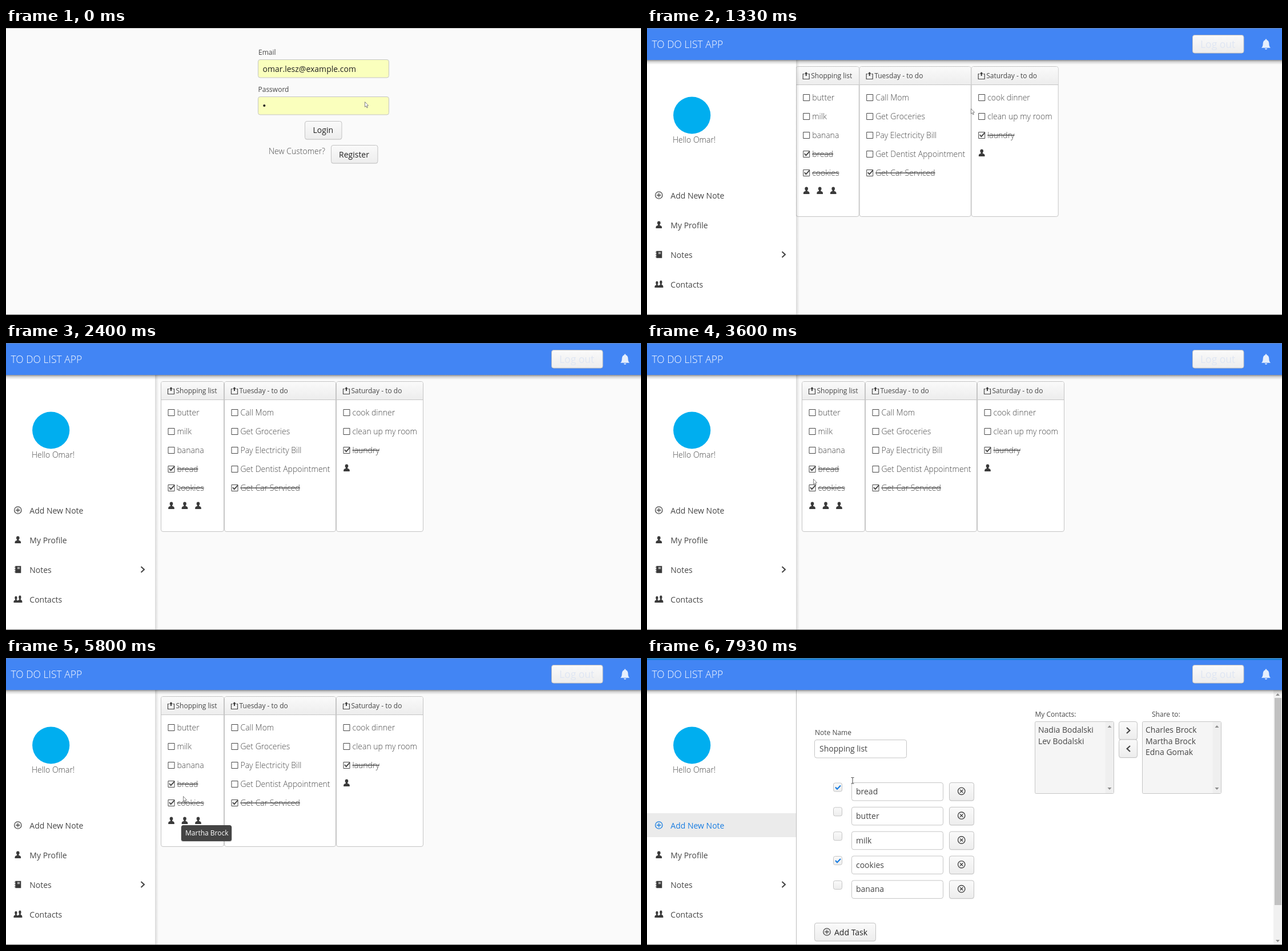
An HTML page that plays this animation: 1112 by 503 pixels, repeating every 8000 ms.

```html
<!DOCTYPE html>
<html lang="en">
<head>
<meta charset="utf-8">
<title>To do list app</title>
<style>
  html, body { margin: 0; width: 100%; height: 100%; overflow: hidden; background: #fafafa; }
  svg { display: block; }
  text { font: 14px "Open Sans", sans-serif; fill: #474747; white-space: pre; }
  .cap { font-size: 12px; }
  .light { font-weight: 300; }
  .done { text-decoration: line-through; }
  .dark { fill: #222; }
  .big { font-size: 17.5px; }
  .line { fill: none; stroke: #474747; }
  .icon { fill: #3a3a3a; }
  .field { fill: #fff; stroke: #c5c5c5; }
  .auto { fill: #faffbd; }
  .editing .nav0 text { fill: #197de1; }
  .editing .nav0 .line { stroke: #197de1; }
</style>
</head>
<body>
<svg id="stage" width="1112" height="503" viewBox="0 0 1112 503">
  <defs>
    <linearGradient id="btn" x2="0" y2="1"><stop stop-color="#fafafa"/><stop offset="1" stop-color="#ededed"/></linearGradient>
    <linearGradient id="press" x2="0" y2="1"><stop stop-color="#f3f3f3"/><stop offset="1" stop-color="#e7e7e7"/></linearGradient>
    <linearGradient id="below" x2="0" y2="1"><stop stop-opacity=".42"/><stop offset=".4" stop-opacity=".16"/><stop offset="1" stop-opacity="0"/></linearGradient>
    <linearGradient id="aside"><stop stop-opacity=".13"/><stop offset="1" stop-opacity="0"/></linearGradient>
  </defs>
</svg>
<script>
const FPS = 15, LOOP = 8000;
const stage = document.getElementById('stage');

// Drawing helpers, each returns markup
const text = (x, y, s, cls = '') => `<text x="${x}" y="${y}" class="${cls}">${s}</text>`;
const rect = (x, y, w, h, attrs = '') => `<rect x="${x}" y="${y}" width="${w}" height="${h}" ${attrs}/>`;
const path = (d, attrs = 'class="line"') => `<path d="${d}" ${attrs}/>`;
const at = (x, y, s) => `<g transform="translate(${x} ${y})">${s}</g>`;
const group = (id, s) => `<g id="${id}">${s}</g>`;
const field = (x, y, w, cls = '') => rect(x, y, w, 31.5, `rx="3.5" class="field ${cls}"`);
const button = (x, y, w, h = 31.5) =>
  rect(x, y + 1, w, h, 'rx="3.5" fill="#000" opacity=".08"') +
  rect(x, y, w, h, 'rx="3.5" fill="url(#btn)" stroke="#c3c3c3"');

const person = '<g class="icon"><ellipse cy="-3.4" rx="2.8" ry="3.2"/>' +
  path('M-5.3 6V4C-5.3 2-3 1.4-1.6.8V-1H1.6V.8C3 1.4 5.3 2 5.3 4V6Z', '') + '</g>';
const plus = '<g class="line" stroke-width="1.3"><circle r="6.2"/><path d="M-3.8 0H3.8M0-3.8V3.8"/></g>';
const cross = '<g class="line" stroke-width="1.4"><circle r="6.2"/><path d="M-2.6-2.6 2.6 2.6M2.6-2.6-2.6 2.6"/></g>';
const chevron = path('M-3-5 2.4 0-3 5', 'class="line" stroke-width="2.2"');
const notebook = path('M-4.5-6.2H5.5V6.2H-4.5Z', 'class="icon"') +
  path('M-1-3.6H3.4M-1-1.6H3.4', 'stroke="#fff"') + path('M-6-4H-4M-6 0H-4M-6 4H-4');
const people = at(-3.4, .6, `<g transform="scale(.75 .9)">${person}</g>`) +
  at(3.6, 0, `<g transform="scale(.75 1)">${person}</g>`);
const clip = path('M3.5-3.5H5.5V5.5H-5.5V-3.5H-3.5', 'class="line" stroke-width="1.2"') +
  path('M0-7 3-3.5H1V0H-1V-3.5H-3Z', 'class="icon"');
const box = done => path('M-5.5-5.5H5.5V5.5H-5.5Z') +
  (done ? path('M-3.5-1-.8 2.2 5.5-4.6', 'class="line" stroke-width="1.9"') : '');

const login =
  text(442, 46.5, 'Email', 'cap') + field(441.5, 55.5, 229, 'auto') +
  text(449.5, 76.5, 'omar.lesz@example.com', 'dark') +
  text(441.5, 111.5, 'Password', 'cap') + field(441.5, 120.5, 229, 'auto') +
  '<circle cx="452.3" cy="136" r="2.1" fill="#222"/>' +
  button(523.5, 163.5, 64.5) +
  group('focus',
    rect(522.5, 162.5, 66.5, 33.5, 'rx="4.5" fill="none" stroke="#8cbef0" stroke-width="2"') +
    rect(523.5, 163.5, 64.5, 31.5, 'rx="3.5" fill="url(#press)" stroke="#2a80dc" stroke-width="1.4"')) +
  text(537.5, 184, 'Login', 'dark') +
  text(460, 221, 'New Customer?', 'light') +
  button(569.5, 205.5, 81.5) + text(583, 226.5, 'Register', 'dark');

function card(x, w, title, items, done, shared) {
  let s = rect(x, 67.5, w, 263, 'rx="3.5" fill="#fff" stroke="#c5c5c5"') +
    path(`M${x + .5} 99V71Q${x + .5} 68 ${x + 3.5} 68H${x + w - 3.5}Q${x + w - .5} 68 ${x + w - .5} 71V99Z`, 'fill="url(#btn)"') +
    path(`M${x} 99.5H${x + w}`, 'stroke="#c5c5c5"') +
    at(x + 17.5, 84, clip) + text(x + 26, 88.3, title, 'cap');
  items.forEach((item, i) => {
    const y = 122 + 33 * i, ticked = i >= items.length - done;
    s += at(x + 18, y, box(ticked)) + text(x + 28, y + 5, item, ticked ? 'light done' : 'light');
  });
  const y = 120 + 33 * items.length;
  for (let i = 0; i < shared; i++) s += at(x + 18 + 23.5 * i, y, person);
  return s;
}

const board =
  card(271.5, 110, 'Shopping list', ['butter', 'milk', 'banana', 'bread', 'cookies'], 2, 3) +
  card(382.5, 195, 'Tuesday - to do',
    ['Call Mom', 'Get Groceries', 'Pay Electricity Bill', 'Get Dentist Appointment', 'Get Car Serviced'], 1, 0) +
  card(578.5, 152, 'Saturday - to do', ['cook dinner', 'clean up my room', 'laundry'], 1, 1);

const tri = (x, y, dir) => path(`M${x - 3.5} ${y + 2 * dir}H${x + 3.5}L${x} ${y - 2 * dir}Z`, 'fill="#8d8d8d"');
function list(x, names) {
  return rect(x, 111.5, 138, 126, 'rx="2" fill="#f5f5f5" stroke="#c5c5c5"') +
    rect(x + 123, 112, 14.5, 125, 'fill="#efefef"') + tri(x + 130.5, 120, 1) + tri(x + 130.5, 229, -1) +
    names.map((n, i) => text(x + 5.5, 131 + 19.5 * i, n)).join('');
}

function taskRow(name, i) {
  const y = 218.5 + 42.85 * i, ticked = i % 3 === 0;
  return rect(326.5, y + .5, 15, 15, 'rx="3" fill="url(#btn)" stroke="#c5c5c5"') +
    (ticked ? path(`M330 ${y + 8}l3 3.2 6-6.2`, 'fill="none" stroke="#197de1" stroke-width="2.2"') : '') +
    field(358.5, y, 160) + text(366, y + 20.5, name) +
    button(529.5, y, 43) + at(550.7, y + 14.8, cross);
}

const editor =
  rect(261, 56, 851, 447, 'fill="#fff"') +
  text(294, 134.5, 'Note Name', 'cap') + field(293.5, 143.5, 161) + text(302, 164, 'Shopping list') +
  ['bread', 'butter', 'milk', 'cookies', 'banana'].map(taskRow).join('') +
  button(293.5, 464.5, 107) + at(315, 480, plus) + text(328, 485.5, 'Add Task', 'dark') +
  text(679.5, 102.5, 'My Contacts:', 'cap') + text(884, 102.5, 'Share to:', 'cap') +
  list(679.5, ['Nadia Bodalski', 'Lev Bodalski']) +
  list(867.5, ['Charles Brock', 'Martha Brock', 'Edna Gomak']) +
  button(826.5, 111.5, 32) + button(826.5, 143, 32) +
  at(843, 127, chevron) + at(843, 159, `<g transform="scale(-1 1)">${chevron}</g>`) +
  rect(1097, 56, 15, 447, 'fill="#f1f1f1"') + rect(1099, 70, 12, 363, 'fill="#c1c1c1"') +
  tri(1104.5, 64, 1) + tri(1104.5, 496, -1) +
  path('M261.5 56V503', 'stroke="#bdbdbd"');

const nav = [['Add New Note', plus], ['My Profile', person], ['Notes', notebook], ['Contacts', people]];
const shell =
  rect(0, 56, 261, 447, 'fill="#fff"') +
  rect(261, 56, 6, 447, 'id="edge" fill="url(#aside)"') +
  rect(0, 272, 261, 42, 'id="picked" fill="#ebebeb"') +
  '<circle cx="78.7" cy="153" r="32.6" fill="#00aeef"/>' +
  text(45, 201, 'Hello Omar!', 'light') +
  nav.map(([label, icon], i) =>
    `<g class="nav${i}">${at(20.8, 293 + 52 * i, icon)}${text(41.3, 298.5 + 52 * i, label)}</g>`).join('') +
  at(239.5, 397, chevron) +
  rect(0, 56, 1112, 8, 'fill="url(#below)"') +
  rect(0, 0, 1112, 56, 'fill="#4285f4"') +
  '<g style="--w:#fff">' + text(8.5, 34.7, 'TO DO LIST APP', 'light big title') + '</g>' +
  button(955.5, 12.5, 89.5) + text(969, 34.5, 'Log out', 'big out') +
  at(1084, 28.5, path('M-8 6.2C-5.2 4-5.6 1-5.2-2.4C-4.8-5.4-3-7-1.2-7.4V-9H1.2V-7.4C3-7 4.8-5.4 5.2-2.4C5.6 1 5.2 4 8 6.2ZM-2.2 7.2H2.2Q1.8 9.2 0 9.2T-2.2 7.2Z', 'fill="#e6effd"')) +
  rect(0, 0, 1112, 3.5, 'id="loading" fill="#167fd6"');

const tip = (id, w, label) => group(id,
  rect(-1, 1, w + 2, 28, 'rx="4" fill="#000" opacity=".16"') +
  rect(0, 0, w, 28, 'rx="3.5" fill="#444"') +
  `<text x="7" y="18.3" class="cap" style="fill:#fff">${label}</text>`);

const pointers =
  group('arrow', path('M.5.5V9.4L2.5 7.6 4 11 5.3 10.4 3.9 7H6.6Z', 'fill="#fff" stroke="#777" stroke-width=".9"')) +
  group('hand', path('M-1.2 7.5V1Q-1.2 0 0 0T1.2 1V4.2Q5.6 4.4 5.6 6.4V8.6Q5.6 10 4.6 11.5H-.4L-3 7.4Q-2.4 6.2-1.2 7.5Z', 'fill="#fff" stroke="#666" stroke-width=".9"')) +
  group('beam', path('M-2.5.5H-.8L0 1 .8.5H2.5M0 1V10.5M-2.5 11H-.8L0 10.5 .8 11H2.5'));

stage.insertAdjacentHTML('beforeend',
  group('login', login) + group('board', board) + group('editor', editor) + group('shell', shell) +
  tip('tip1', 84, 'Edna Gomak') + tip('tip2', 88, 'Martha Brock') + tip('tip3', 129, 'Click to edit the note') +
  rect(0, 0, 1112, 1, 'fill="#8a8a8a" opacity=".55"') + rect(0, 502, 1112, 1, 'fill="#6f6f6f"') +
  group('pointer', pointers));

const el = {};
stage.querySelectorAll('[id]').forEach(n => el[n.id] = n);
stage.querySelector('.title').style.fill = '#fff';
stage.querySelector('.out').style.fill = '#dfe6f3';

// Pointer track: time, x, y
const track = [
  [0, 628, 129], [600, 562, 141], [1267, 562, 141], [1333, 567, 141], [2067, 567, 141],
  [2400, 299, 248], [2600, 354, 219], [2867, 354, 219], [3133, 277, 239], [3200, 277, 239],
  [3400, 281, 244], [3600, 291, 238], [4533, 291, 238], [4600, 290, 241], [5133, 290, 241],
  [5800, 310, 242], [6400, 310, 242], [7133, 365, 221], [7800, 365, 221], [7866, 360, 209], [8000, 360, 209]
];

function pointerAt(t) {
  const i = Math.max(1, track.findIndex(k => k[0] >= t));
  const [t0, x0, y0] = track[i - 1], [t1, x1, y1] = track[i];
  const u = (t - t0) / (t1 - t0), e = u * u * (3 - 2 * u);
  return [x0 + (x1 - x0) * e, y0 + (y1 - y0) * e];
}

const show = (id, on) => el[id].style.display = on ? '' : 'none';
const move = (id, x, y) => el[id].setAttribute('transform', `translate(${x} ${y})`);

function render(ms) {
  const t = Math.floor((ms % LOOP + 5) * FPS / 1000) * 1000 / FPS;
  const within = (a, b) => t >= a - 5 && t < b - 5;
  const signedIn = t >= 1330, editing = t >= 7860;

  show('login', !signedIn);
  show('focus', within(930, 1330));
  show('shell', signedIn);
  show('board', signedIn && !editing);
  ['editor', 'picked', 'loading'].forEach(id => show(id, editing));
  show('edge', !editing);
  el.shell.classList.toggle('editing', editing);
  move('board', t < 1595 ? -10.3 : 0, 0);

  show('tip1', within(4330, 5400));
  move('tip1', 283, 293);
  show('tip2', within(5600, 6670));
  if (t < 5730) move('tip2', 325, 321); else move('tip2', 307, 293);
  show('tip3', within(7270, 7600));
  move('tip3', 272, 331);

  const hand = within(400, 1330);
  show('hand', hand);
  show('beam', editing);
  show('arrow', !hand && !editing);
  move('pointer', ...pointerAt(t));
}

const start = performance.now();
function tick() {
  render(performance.now() - start);
  requestAnimationFrame(tick);
}
tick();
</script>
</body>
</html>
```
